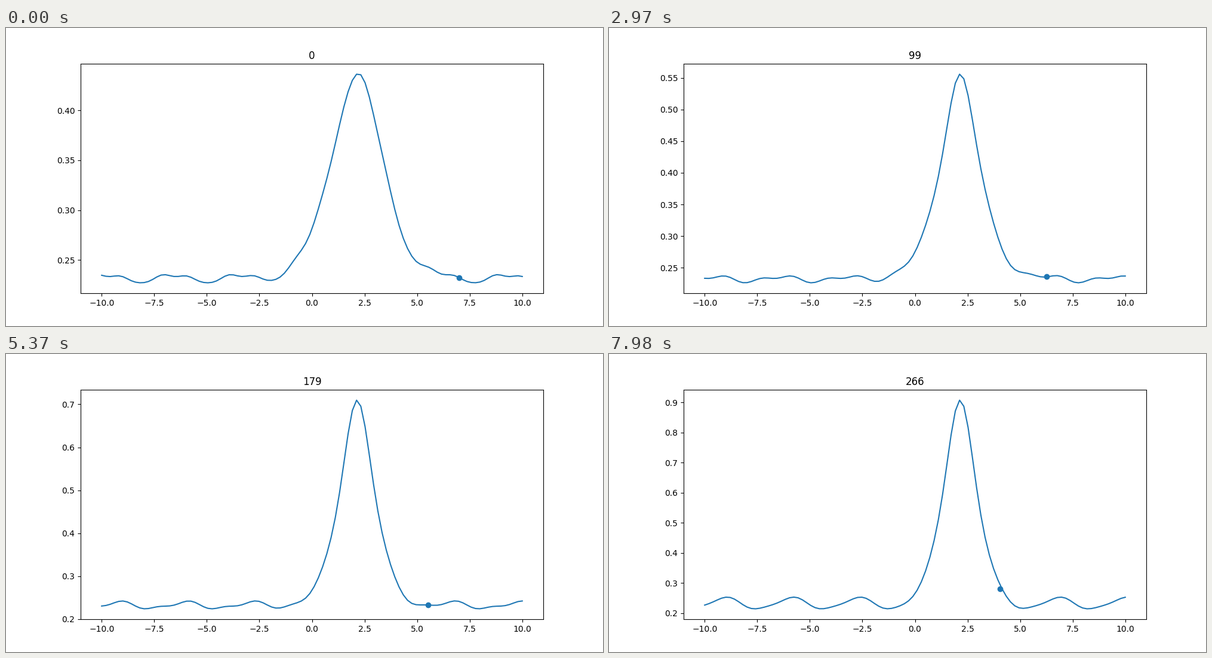
Animation of 1000 by 500 pixels, one loop 8 s. Source, as a matplotlib script:

```python
import numpy as np
import matplotlib.pyplot as plt
from matplotlib.animation import FuncAnimation

FRAMES = 267
LOOP_MS = 8000
CENTRE = 2.14    # middle of the bump
PERIOD = 3.17    # length of one ripple
LAG = 4          # the dot's height trails its position, in frames

x = np.linspace(-10, 10, 100)


def track(steps, values):
    """Smooth cubic path through a few key points."""
    slopes = np.gradient(values, steps, edge_order=2)

    def at(n):
        k = min(np.searchsorted(steps, n, side="right"), len(steps) - 1) - 1
        width = steps[k + 1] - steps[k]
        s = (n - steps[k]) / width
        ease = s * s * (3 - 2 * s)
        bend = s * (1 - s) * ((1 - s) * slopes[k] - s * slopes[k + 1])
        return values[k] + (values[k + 1] - values[k]) * ease + width * bend

    return at


keys = [0, 38, 68, 129, 179, 209, 266]
high = track(keys, [.4362, .4664, .5044, .6122, .7097, .7760, .9076])
dot_x = track(keys, [7.0, 6.77, 6.515, 6.003, 5.522, 5.123, 4.046])


def low(u):
    return 0.2273 - 0.003 * u - 0.0104 * u ** 5


def gauss(sigma):
    return np.exp(-((x - CENTRE) / sigma) ** 2 / 2)


def bump(u):
    """Weight moves from a wide Gaussian to two narrower ones."""
    wide = 238 * (1 - u) ** 1.7
    narrow = 91 * (1 - (1 - u) ** 2.3)
    middle = 345 - wide - narrow
    return wide * gauss(1.414) + middle * gauss(0.869) + narrow * gauss(0.4815)


def ripple(u):
    """Double-humped wave that turns into a single leaning one."""
    a = 2 * np.pi * (x + 9.97) / PERIOD
    first = (5.76 - 8.4 * u) * np.cos(a) + (2.4 + 6.5 * u ** 2) * np.sin(a)
    second = ((-0.9 - 3.6 * u + 4.6 * u ** 2) * np.cos(2 * a)
              + (0.6 * u ** 2 - 2.2) * np.sin(2 * a))
    third = -0.86 * np.exp(-6 * u) * np.sin(3 * a)
    return first + second + third


def curve(n):
    u = n / (FRAMES - 1)
    shape = bump(u) + ripple(u)
    shape = (shape - shape.min()) / np.ptp(shape)
    return low(u) + (high(n) - low(u)) * shape


fig, ax = plt.subplots(figsize=(10, 5), dpi=100)
line, = ax.plot(x, curve(0), color="C0")
dot, = ax.plot([], [], "o", color="C0")
title = ax.set_title("0")
ax.set_xlim(-11, 11)


def draw(n):
    y = curve(n)
    line.set_ydata(y)
    dot.set_data([dot_x(n)], [np.interp(dot_x(max(n - LAG, 0)), x, y)])
    title.set_text(str(n))
    margin = 0.05 * np.ptp(y)
    ax.set_ylim(y.min() - margin, y.max() + margin)
    return line, dot, title


anim = FuncAnimation(fig, draw, frames=FRAMES, interval=LOOP_MS / FRAMES,
                     repeat=True, repeat_delay=0, blit=False)
plt.show()
```
